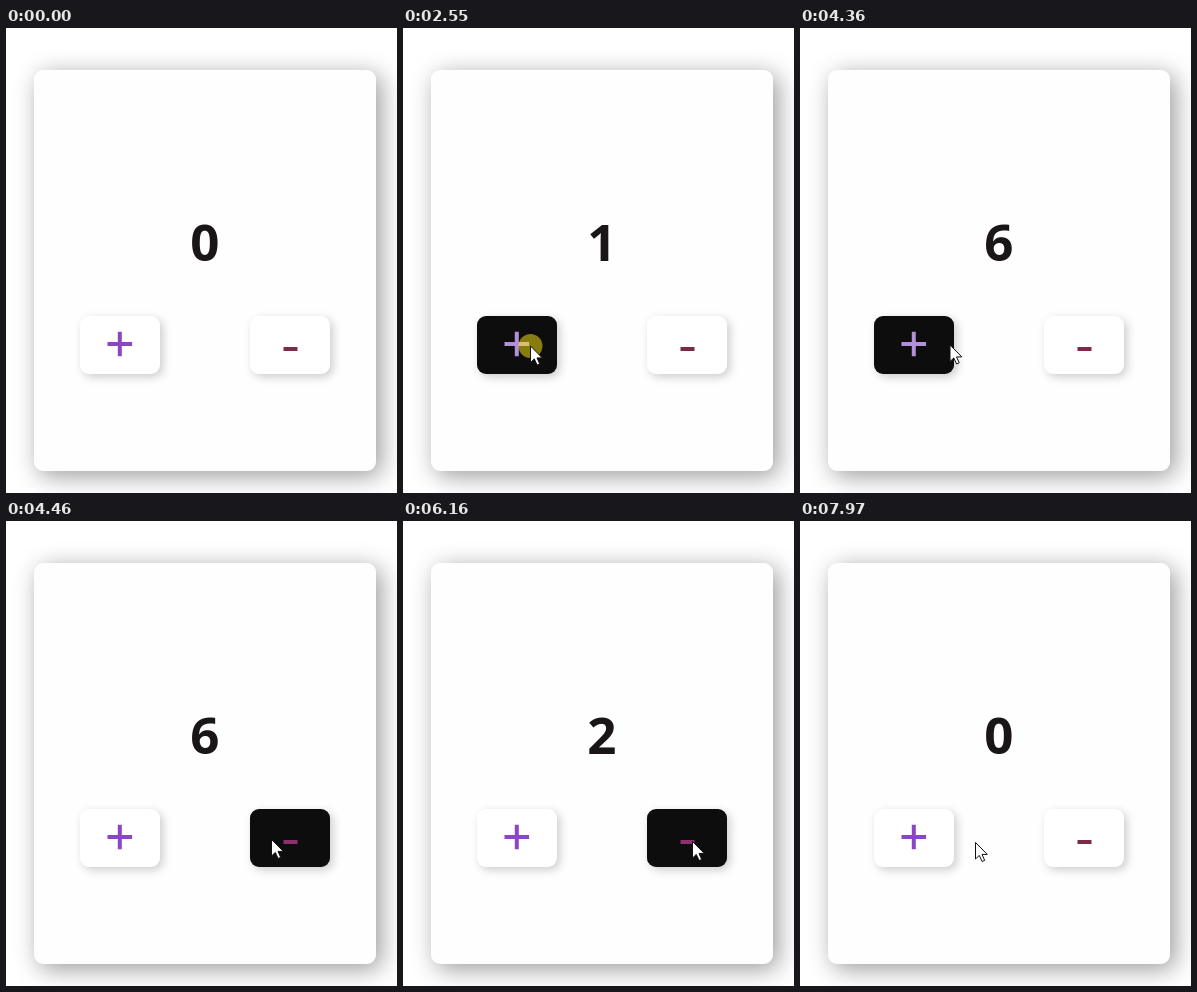
An HTML page for the animation above (8000 ms loop, 391x465 px).

```html
<!DOCTYPE html>
<html lang="en">
<head>
<meta charset="utf-8">
<title>Counter</title>
<style>
  html, body { margin: 0; width: 100%; height: 100%; overflow: hidden; background: #fff; }
  .card, .btn, svg { position: absolute; }
  .card { left: 28px; top: 42px; width: 342px; height: 401px; border-radius: 9px;
    background: #fefefe; box-shadow: 5px 5px 25px rgba(0, 0, 0, .4); }
  .btn { top: 288px; width: 80px; height: 58px; border-radius: 9px;
    background: #fff; box-shadow: 3px 3px 10px rgba(0, 0, 0, .2); }
  .btn.hover { background: #0d0d0d; }
  #plus { left: 74px; }
  #minus { left: 244px; }
  svg { left: 0; top: 0; }
  #count { font: 700 51px "Open Sans", "Noto Sans", sans-serif; text-anchor: middle; fill: #1a1618; }
  #plusSign { fill: #8b45c5; }
  #plusSign.hover { fill: #b48fd9; }
  #minusSign { fill: #7c2a47; }
  #minusSign.hover { fill: #8f2f6c; }
</style>
</head>
<body>
<div class="card"></div>
<div class="btn" id="plus"></div>
<div class="btn" id="minus"></div>
<svg width="391" height="465" viewBox="0 0 391 465">
  <text id="count" x="198.8" y="233">0</text>
  <path id="plusSign" d="M101.5 314h10.3v-10.3h4V314h10.3v4h-10.3v10.3h-4V318h-10.3z"/>
  <path id="minusSign" d="M277.5 319h14v4h-14z"/>
  <circle id="press" r="12" fill="#ffee10" fill-opacity=".5"/>
  <path id="cursor" d="M0 0V16.5L3.8 12.9L6.6 19L9.2 17.9L6.5 11.9H11.8Z"
    fill="#fff" stroke="#111" stroke-width="1" stroke-linejoin="miter"/>
</svg>
<script>
const LOOP = 8000;
const el = id => document.getElementById(id);

// [time, x, y]: the pointer jumps to each spot and rests there
const moves = [
  [1060, 165, 458], [1110, 161, 440], [1160, 157, 420], [1210, 152, 400],
  [1260, 147, 381], [1310, 142, 363], [1370, 137, 346], [1430, 134.5, 335.5],
  [1500, 131, 327], [1550, 129, 322], [1600, 128, 319], [1650, 127.5, 318],
  [4360, 150, 317], [4410, 215, 317], [4460, 265.5, 318.5], [4510, 282, 320],
  [4560, 289.5, 320.5],
  [7810, 279, 320], [7860, 252, 320], [7910, 213, 321], [7970, 175.5, 321.5]
];

// [press, release]
const clicks = [
  [2130, 2330], [2550, 2770], [2870, 3090], [3190, 3350], [3450, 3720],
  [4630, 4680], [5100, 5320], [5570, 5790], [5890, 6160],
  [6380, 6530], [6700, 6850], [7020, 7170], [7290, 7440]
];

// [time, change]; the count never drops below zero
const steps = clicks.map(([, up]) => [up, up < 4000 ? 1 : -1]);
steps.splice(4, 0, [3450, 1]);

const countAt = t => steps.reduce((n, [at, d]) => at <= t ? Math.max(0, n + d) : n, 0);
const inside = (p, left) => !!p && p[1] >= left && p[1] < left + 80 && p[2] >= 288 && p[2] < 346;

function render(t) {
  const spot = moves.filter(m => m[0] <= t).pop();
  const pressed = clicks.some(([down, up]) => t >= down && t < up);
  el("count").textContent = countAt(t);
  for (const [id, left] of [["plus", 74], ["minus", 244]]) {
    const over = inside(spot, left);
    el(id).classList.toggle("hover", over);
    el(id + "Sign").classList.toggle("hover", over);
  }
  el("cursor").style.display = spot ? "" : "none";
  el("press").style.display = pressed ? "" : "none";
  if (!spot) return;
  const place = `translate(${spot[1]} ${spot[2]})`;
  el("cursor").setAttribute("transform", place);
  el("press").setAttribute("transform", place);
}

const start = performance.now();
function tick() {
  render((performance.now() - start) % LOOP);
  requestAnimationFrame(tick);
}
tick();
</script>
</body>
</html>
```
